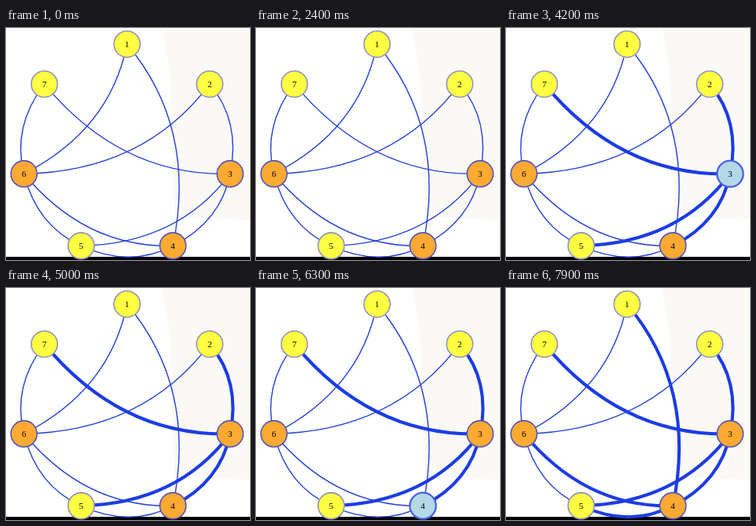
Recreate the animation shown at these times as an HTML page with a canvas. Size 306x290 px, loop 8 s.

```html
<!DOCTYPE html>
<html lang="en">
<head>
<meta charset="utf-8">
<title>Graph traversal</title>
<style>
html, body { margin: 0; width: 100%; height: 100%; overflow: hidden; background: #fff; }
canvas { display: block; width: 306px; height: 290px; }
</style>
</head>
<body>
<canvas id="stage"></canvas>
<script>
const W = 306, H = 290, LOOP = 8000;
const COUNT = 7, RING = 132.6, CX = 151.8, CY = 152.8, RADIUS = 16.4;
const BEND = 0.242, SKEW = 0.47;
const FIRST = 2700, STEP = 950;

const canvas = document.getElementById('stage');
const ctx = canvas.getContext('2d');
const scale = window.devicePixelRatio || 1;
canvas.width = W * scale;
canvas.height = H * scale;
ctx.scale(scale, scale);

const hubs = [3, 4, 6];
const edges = ['16', '14', '26', '37', '23', '34', '35', '46', '45', '67', '56']
  .map(pair => [...pair].map(Number));

// A hub is highlighted, its edges turn bold, it is released; then the next one.
const visits = hubs.map((node, i) => {
  const start = FIRST + 3 * STEP * i;
  return { node, start, mark: start + STEP, end: start + 2 * STEP };
});

const styles = {
  plain: { fill: '#ffff42', line: '#9494bd', width: 1.6 },
  hub: { fill: '#fdaa32', line: '#5757b6', width: 1.6 },
  active: { fill: '#b3d9e8', line: '#4a5ee6', width: 2.2 }
};

function place(id) {
  const angle = (id - 1) * 2 * Math.PI / COUNT;
  return [CX + RING * Math.sin(angle), CY - RING * Math.cos(angle)];
}

function drawBackground() {
  ctx.fillStyle = '#fff';
  ctx.fillRect(0, 0, W, H);
  ctx.fillStyle = '#fbf9f6';
  ctx.beginPath();
  ctx.moveTo(196, 0);
  ctx.lineTo(W, 0);
  ctx.lineTo(W, 240);
  ctx.lineTo(212, 236);
  ctx.lineTo(206, 60);
  ctx.fill();
  ctx.fillStyle = '#000';
  ctx.fillRect(0, 286, W, H - 286);
}

// Every edge bows to the same side, seen from its lower node.
function drawEdge([a, b], bold) {
  const [x1, y1] = place(a), [x2, y2] = place(b);
  const dx = x2 - x1, dy = y2 - y1;
  ctx.beginPath();
  ctx.moveTo(x1, y1);
  ctx.quadraticCurveTo(x1 + SKEW * dx + BEND * dy, y1 + SKEW * dy - BEND * dx, x2, y2);
  ctx.lineWidth = bold ? 4 : 1.4;
  ctx.strokeStyle = bold ? '#1c3ce4' : '#2443d6';
  ctx.stroke();
}

function drawNode(id, active) {
  const [x, y] = place(id);
  const { fill, line, width } = styles[active ? 'active' : hubs.includes(id) ? 'hub' : 'plain'];
  ctx.beginPath();
  ctx.arc(x, y, RADIUS, 0, Math.PI * 2);
  ctx.fillStyle = fill;
  ctx.fill();
  ctx.lineWidth = width;
  ctx.strokeStyle = line;
  ctx.stroke();
  ctx.fillStyle = '#000';
  ctx.fillText(id, x, y + 3.7);
}

function draw(t) {
  const current = visits.find(v => t >= v.start && t < v.end);
  const marked = visits.filter(v => t >= v.mark).map(v => v.node);
  drawBackground();
  edges.forEach(edge => drawEdge(edge, edge.some(id => marked.includes(id))));
  ctx.font = '11px "Liberation Serif", "Times New Roman", serif';
  ctx.textAlign = 'center';
  for (let id = 1; id <= COUNT; id++) drawNode(id, current?.node === id);
}

const begin = performance.now();
function frame() {
  draw((performance.now() - begin) % LOOP);
  requestAnimationFrame(frame);
}
draw(0);
requestAnimationFrame(frame);
</script>
</body>
</html>
```
